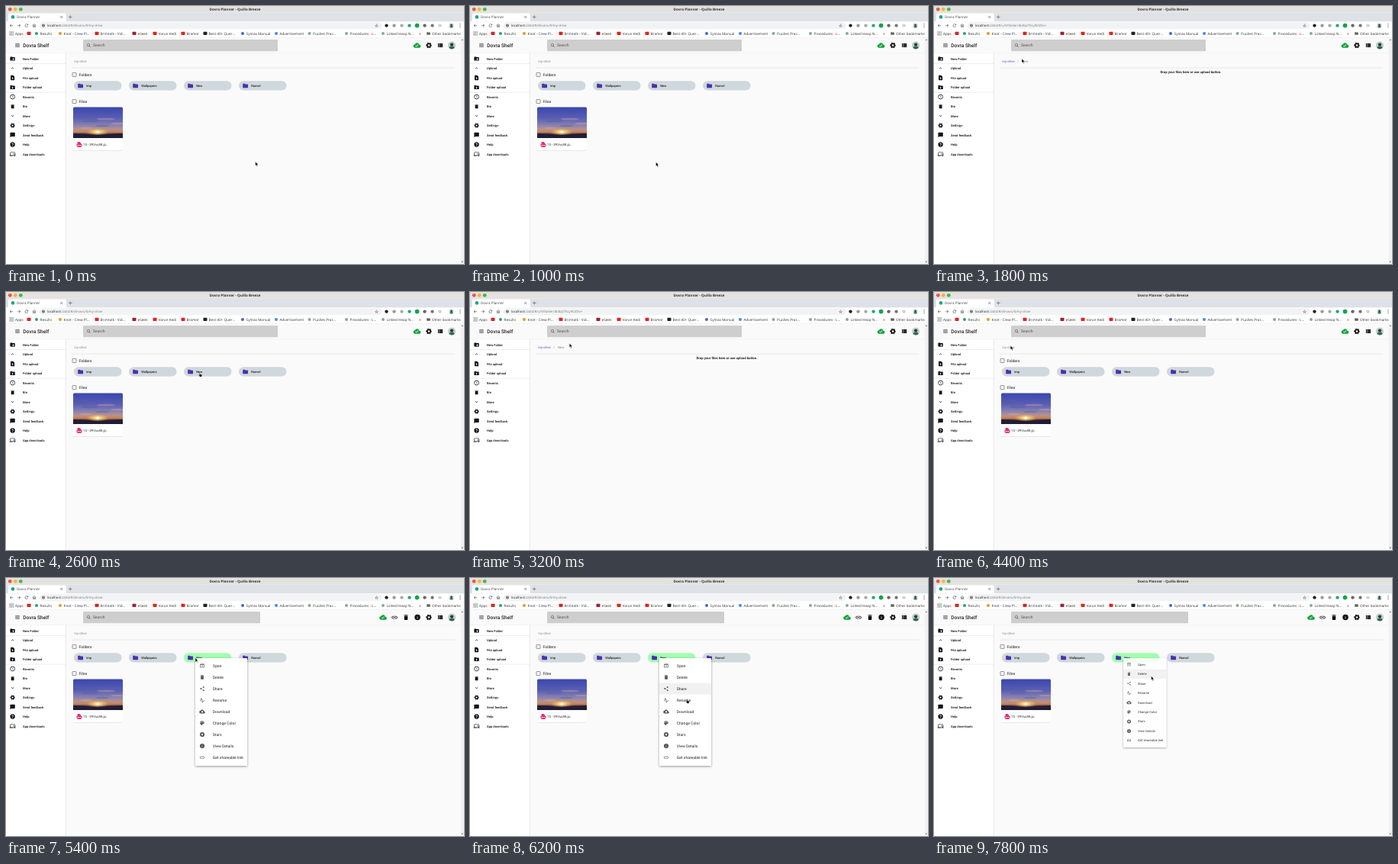
An HTML page for the animation above (8000 ms loop, 600 by 338 pixels).

```html
<!DOCTYPE html>
<html lang="en">
<head>
<meta charset="utf-8">
<title>Dovra Planner</title>
<style>
html, body { margin: 0; width: 100%; height: 100%; overflow: hidden; background: #fafafa; }
svg { display: block; width: 100%; height: 100%; }
text { font-family: Roboto, sans-serif; white-space: pre; text-rendering: geometricPrecision; }
.ui { font-family: "Open Sans", "Noto Sans", sans-serif; }
</style>
</head>
<body>
<svg id="stage" viewBox="0 0 600 338">
  <defs>
    <linearGradient id="sky" x1="0" y1="0" x2="0" y2="1">
      <stop offset="0" stop-color="#3a45ae"/>
      <stop offset=".38" stop-color="#5960b4"/>
      <stop offset=".58" stop-color="#8580b2"/>
      <stop offset=".72" stop-color="#b8918f"/>
      <stop offset=".81" stop-color="#c9854f"/>
      <stop offset=".87" stop-color="#5a3a4c"/>
      <stop offset="1" stop-color="#1d1a33"/>
    </linearGradient>
    <radialGradient id="sun">
      <stop offset="0" stop-color="#fffde0"/>
      <stop offset=".25" stop-color="#ffe58a" stop-opacity=".9"/>
      <stop offset="1" stop-color="#ffb74d" stop-opacity="0"/>
    </radialGradient>
    <filter id="shade" x="-20%" y="-20%" width="140%" height="140%">
      <feDropShadow dx="0" dy="1" stdDeviation="1.4" flood-opacity=".4"/>
    </filter>
    <filter id="soft" x="-20%" y="-20%" width="140%" height="140%">
      <feDropShadow dx="0" dy=".4" stdDeviation=".5" flood-opacity=".18"/>
    </filter>
    <clipPath id="photo"><path d="M88 173V134q0-1.5 1.5-1.5h62q1.5 0 1.5 1.5v39z"/></clipPath>
  </defs>
</svg>
<script>
const DISC = 'M12 2a10 10 0 1 0 0 20 10 10 0 0 0 0-20z';
const FOLDER = 'M10 4H4a2 2 0 0 0-2 2v12a2 2 0 0 0 2 2h16a2 2 0 0 0 2-2V8a2 2 0 0 0-2-2h-8z';
const CLOUD = 'M19.4 10A7.5 7.5 0 0 0 5.4 8 6 6 0 0 0 6 20h13a5 5 0 0 0 .4-10z';
const dot = (x, y, r) => `M${x - r} ${y}a${r} ${r} 0 1 0 ${2 * r} 0 ${r} ${r} 0 0 0 ${-2 * r} 0z`;
const ICONS = {
  menu: 'M3 18h18v-2H3zM3 13h18v-2H3zM3 6v2h18V6z',
  folder: FOLDER,
  newFolder: FOLDER + 'M19 13h-3v-3h-2v3h-3v2h3v3h2v-3h3z',
  upFolder: FOLDER + 'M11 18v-4H8l4-4 4 4h-3v4z',
  up: 'M12 8l-6 6 1.4 1.4L12 10.8l4.6 4.6L18 14z',
  down: 'M16.6 8.6L12 13.2 7.4 8.6 6 10l6 6 6-6z',
  file: 'M6 2a2 2 0 0 0-2 2v16a2 2 0 0 0 2 2h12a2 2 0 0 0 2-2V8l-6-6zM11 18v-4H8l4-4 4 4h-3v4z',
  image: 'M6 1h8l6 6v3h3v9h-3v4H4v-4H1v-9h3V3zM5 13v4h4v-4zM11 13v4h3v-4zM16 13v4h3v-4z',
  clock: DISC + dot(12, 12, 8) + 'M11 7h1.5v5.2l4.5 2.7-.8 1.3L11 13z',
  trash: 'M6 19a2 2 0 0 0 2 2h8a2 2 0 0 0 2-2V7H6zM19 4h-3.5l-1-1h-5l-1 1H5v2h14z',
  chat: 'M20 2H4a2 2 0 0 0-2 2v18l4-4h14a2 2 0 0 0 2-2V4a2 2 0 0 0-2-2z',
  help: DISC + 'M11 17h2v2h-2zM13 15h-2c0-3 3-3 3-5a2 2 0 0 0-4 0H8a4 4 0 0 1 8 0c0 2.5-3 2.8-3 5z',
  info: DISC + 'M11 11h2v6h-2zM11 7h2v2h-2z',
  devices: 'M4 6h18V4H4a2 2 0 0 0-2 2v11H0v3h14v-3H4zM23 8h-6a1 1 0 0 0-1 1v10a1 1 0 0 0 1 1h6a1 1 0 0 0 1-1V9a1 1 0 0 0-1-1zM22 17h-4v-7h4z',
  synced: CLOUD + 'M10 17l-3.5-3.5 1.4-1.4 2.1 2.1 5.2-5.2 1.4 1.4z',
  download: CLOUD + 'M17 13l-5 5-5-5h3V9h4v4z',
  link: 'M4 12a3 3 0 0 1 3-3h4V7H7a5 5 0 0 0 0 10h4v-2H7a3 3 0 0 1-3-3zM8 13h8v-2H8zM17 7h-4v2h4a3 3 0 0 1 0 6h-4v2h4a5 5 0 0 0 0-10z',
  list: 'M3 5h4v4H3zM3 10h4v4H3zM3 15h4v4H3zM8 5h13v4H8zM8 10h13v4H8zM8 15h13v4H8z',
  open: 'M19 4H5a2 2 0 0 0-2 2v12a2 2 0 0 0 2 2h4v-2H5V8h14v10h-4v2h4a2 2 0 0 0 2-2V6a2 2 0 0 0-2-2zM12 10l-4 4h3v6h2v-6h3z',
  share: dot(18, 5, 3) + dot(6, 12, 3) + dot(18, 19, 3) + 'M8.5 10l7-4 .8 1.5-7 4zM8.5 14l7 4 .8-1.5-7-4z',
  rename: 'M12.5 16h2L9.4 3H7.6L2.5 16h2l1.1-3h5.8zM6.4 11L8.5 5.5 10.6 11zM21.6 11.6L13.5 19.7 9.8 16l-1.4 1.4 5.1 5.1L23 13z',
  palette: 'M12 3a9 9 0 0 0 0 18 1.5 1.5 0 0 0 1-2.5c-.8-1 0-2.5 1.2-2.5H16a5 5 0 0 0 5-5c0-4.4-4-8-9-8z' +
    dot(6.5, 10.5, 1.5) + dot(9.5, 6.5, 1.5) + dot(14.5, 6.5, 1.5) + dot(17.5, 10.5, 1.5),
  star: DISC + 'M12 6l1.5 4 4.3.2-3.4 2.6 1.2 4.2-3.6-2.4-3.6 2.4 1.2-4.2-3.4-2.6 4.3-.2z',
  search: 'M15.5 14h-.8a6.5 6.5 0 1 0-.7.7v.8l5 5 1.5-1.5zM9.5 14a4.5 4.5 0 1 1 0-9 4.5 4.5 0 0 1 0 9z',
  back: 'M20 11H7.8l5.6-5.6L12 4l-8 8 8 8 1.4-1.4L7.8 13H20z',
  forward: 'M4 11h12.2l-5.6-5.6L12 4l8 8-8 8-1.4-1.4 5.6-5.6H4z',
  reload: 'M17.6 6.4A8 8 0 1 0 19.7 14h-2.1A6 6 0 1 1 16.2 7.8L13 11h7V4z',
  home: 'M12 3L2 12h3v8h6v-6h2v6h6v-8h3zM12 5.7l5 4.5V18h-2v-6H9v6H7v-7.8z',
  fav: 'M12 2l3 7 7 .6-5.3 4.8 1.6 7.1L12 17.8l-6.3 3.7 1.6-7.1L2 9.6 9 9zM12 6l-1.8 4.4-4.7.4 3.6 3.1-1.1 4.6 4-2.4 4 2.4-1.1-4.6 3.6-3.1-4.7-.4z'
};

const rect = (x, y, w, h, fill, extra = '') =>
  `<rect x="${x}" y="${y}" width="${w}" height="${h}" fill="${fill}" ${extra}/>`;
const circle = (x, y, r, fill, extra = '') => `<circle cx="${x}" cy="${y}" r="${r}" fill="${fill}" ${extra}/>`;
const text = (s, x, y, size, fill, extra = '') =>
  `<text x="${x}" y="${y}" font-size="${size}" fill="${fill}" ${extra}>${s}</text>`;
const path = (d, fill, extra = '') => `<path d="${d}" fill="${fill}" ${extra}/>`;
const UI = 'class="ui"', BOLD = 'font-weight="500"';
const group = (id, body) => `<g id="${id}">${body}</g>`;

function icon(name, x, y, size, fill = '#111') {
  const place = `transform="translate(${x - size / 2} ${y - size / 2}) scale(${size / 24})"`;
  if (name === 'gear') {
    return `<g ${place} fill="none" stroke="${fill}"><circle cx="12" cy="12" r="5.8" stroke-width="4.6"/>` +
      `<circle cx="12" cy="12" r="8.8" stroke-width="2.8" stroke-dasharray="4.6 4.615" stroke-dashoffset="2.3"/></g>`;
  }
  return path(ICONS[name], fill, `fill-rule="evenodd" ${place}`);
}

const avatar = (x, y, r) => circle(x, y, r, '#b9cfca') +
  circle(x, y - r * .2, r * .42, '#37322f') +
  path(`M${x - r * .75} ${y + r * .64}a${r * .78} ${r * .7} 0 0 1 ${r * 1.5} 0a${r} ${r} 0 0 1 ${-r * 1.5} 0z`, '#2f6b50');

function browser() {
  let s = rect(0, 0, 600, 8.5, '#e4e2df') + rect(0, 8.5, 600, 12, '#dee1e6');
  ['#f0524a', '#f5b52e', '#3fb950'].forEach((c, i) => s += circle(5.3 + 7 * i, 4.3, 2.4, c));
  s += text('Dovra Planner - Quillo Breeze', 300, 6.2, 4.6, '#333', UI + ' font-weight="700" text-anchor="middle"');
  s += path('M1 20.5q2 0 2-2v-7q0-2 2-2h72q2 0 2 2v7q0 2 2 2z', '#fff');
  s += circle(9, 14.4, 2.3, '#1fa67a') + text('Dovra Planner', 14, 16, 4.6, '#444', UI);
  s += path('M71 13l3 3m0-3l-3 3M82 14.4h4.6m-2.3-2.3v4.6', 'none', 'stroke="#555" stroke-width=".6"');
  s += rect(0, 20.5, 600, 21, '#fff') + rect(43.5, 21.2, 449, 9, '#f1f3f4', 'rx="4.5"');
  ['back', 'forward', 'reload', 'home'].forEach((n, i) => s += icon(n, 7 + 10 * i, 25.6, 6.4, '#555'));
  s += icon('info', 49, 25.6, 5, '#777') + icon('fav', 485.5, 25.6, 5.6, '#555');
  ['#222', '#999', '#aaa', '#1fa67a', '#17a34a', '#666', '#777', '#d0d0d0'].forEach((c, i) =>
    s += circle(498.5 + 10 * i, 25.6, i === 4 ? 2.9 : 2.2, c));
  s += avatar(583.5, 25.6, 3);
  for (let i = -1; i < 2; i++) s += circle(595, 25.6 + 2 * i, .6, '#555');

  for (let i = 0; i < 9; i++)
    s += rect(4.5 + 2 * (i % 3), 33.3 + 2 * (i / 3 | 0), 1.3, 1.3, ['#e05244', '#4a8bea', '#3aa657'][i % 3]);
  s += text('Apps', 12, 37.6, 4.6, '#333', UI);
  const marks = [
    [30, 'r#e62117', ''], [40, 'c#1fa67a', 'Results'], [71, 'c#f29423', 'Knot - Crew Pl...'],
    [119, 'r#e62117', 'Brimtalk - Vid...'], [168, 'r#a3202c', 'eSeek'], [195, 'r#e62117', 'Varun Kedi'],
    [232, 'r#e62117', 'Bramor'], [261, 'r#222', 'Best 40+ Quer...'], [310, 'c#4b62c9', 'Syntax Manual'],
    [354, 'c#4285f4', 'Advertisement'], [397.5, 'c#7fb08a', 'Puzzles Prac...'],
    [446, 'c#7fb08a', 'Procedures - L...'], [494, 'c#7fb08a', 'Linked Heap N...']
  ];
  for (const [x, mark, label] of marks) {
    const c = mark.slice(1);
    s += mark[0] === 'r' ? rect(x - 2.5, 33.7, 5, 4.4, c, 'rx=".8"') : circle(x, 36, 2, c);
    s += text(label, x + 4.6, 37.6, 4.65, '#333', UI);
  }
  s += text('»', 541, 37.6, 5.4, '#333', UI) + icon('folder', 553.5, 36, 5.6, '#666') +
    text('Other bookmarks', 558, 37.6, 4.6, '#333', UI);
  return s + rect(0, 41, 600, .5, '#ddd');
}

function sidebar() {
  const items = [['newFolder', 'New Folder'], ['up', 'Upload'], ['file', 'File upload'], ['upFolder', 'Folder upload'],
    ['clock', 'Recents'], ['trash', 'Bin'], ['down', 'More'], ['gear', 'Settings'], ['chat', 'Send feedback'],
    ['help', 'Help'], ['devices', 'App downloads']];
  return rect(0, 62, 78, 276, '#fff') + rect(77.8, 62, .6, 276, '#ddd') +
    rect(0, 75.3, 78, .5, '#ddd') + rect(0, 112.8, 78, .5, '#ddd') +
    items.map(([n, label], i) => icon(n, 8.6, 69 + 12.5 * i, 7.6) +
      text(label, 22, 70.6 + 12.5 * i, 4.15, '#111', BOLD)).join('');
}

function appBar() {
  return rect(0, 41.5, 596, 20.5, '#fafafa') + rect(0, 61.7, 596, .5, '#e8e8e8') +
    icon('menu', 15, 51.5, 7.6) + text('Dovra Shelf', 22.3, 53.6, 6.6, '#222', BOLD) +
    rect(101, 44, 255, 15.2, '#cecece', 'id="field" rx="1"') +
    icon('search', 108.5, 51.6, 7, '#555') + text('Search', 114, 53.4, 5.1, '#555') +
    group('plainBar', icon('synced', 538.5, 51.5, 9.6, '#12a53a')) +
    group('pickBar', icon('synced', 494, 51.5, 9.6, '#12a53a') + icon('link', 509, 51.5, 9) +
      icon('trash', 524, 51.5, 9) + icon('info', 539, 51.5, 9)) +
    icon('gear', 554, 51.5, 9) + icon('list', 569, 51.5, 8.4) + avatar(584, 51.5, 5);
}

function drive() {
  const heading = (label, y) => rect(87, y - 2.6, 5, 5, 'none', 'rx=".5" stroke="#666" stroke-width=".7"') +
    text(label, 95.5, y + 1.8, 5.1, '#444', BOLD);
  let s = text('my-drive', 89.3, 73.6, 4.3, '#888') + heading('Folders', 90) + heading('Files', 125.2);
  ['imp', 'Wallpapers', 'New', 'Ranvel'].forEach((label, i) => {
    const x = 89 + 72 * i;
    s += rect(x, 98.2, 62.5, 12.4, '#cfd8dc', `rx="6.2" ${i === 2 ? 'id="chip"' : ''}`) +
      icon('folder', x + 8.6, 104.5, 8.2, '#4a2fb0') + text(label, x + 16.2, 106, 4.1, '#222', BOLD);
  });
  s += rect(88, 132.5, 65, 56.5, '#fff', 'rx="1.5" filter="url(#soft)"');
  s += '<g clip-path="url(#photo)">' + rect(88, 132, 65, 41, 'url(#sky)');
  for (let i = 0; i < 6; i++)
    s += `<ellipse cx="${94 + 37 * i % 58}" cy="${145 + 3 * i}" rx="${13 - i}" ry="1.3" fill="${i % 2 ? '#d9a7a0' : '#5a5590'}" opacity=".4"/>`;
  s += '<ellipse cx="120" cy="165" rx="15" ry="5" fill="url(#sun)"/>' + circle(120, 165, 1.8, '#fffbe0') +
    path('M88 167l14 .5 18 1.5 18-1.5 15-.5v6H88z', '#211d35') + '</g>';
  return s + icon('image', 96, 181.6, 7.6, '#e5316f') + text('15 - S9Vux88.jp..', 101, 183.2, 4.35, '#333');
}

const folder = () => text('my-drive', 89.3, 73.6, 4.3, '#3f62c8') + text('/', 109.5, 73.6, 4.3, '#999') +
  text('New', 115, 73.6, 4.3, '#888') +
  text('Drop your files here or use upload button.', 336.5, 88, 4.3, '#222', 'font-weight="700" text-anchor="middle"');

function menu() {
  const items = [['open', 'Open'], ['trash', 'Delete'], ['share', 'Share'], ['rename', 'Rename'], ['download', 'Download'],
    ['palette', 'Change Color'], ['star', 'Stars'], ['info', 'View Details'], ['link', 'Get shareable link']];
  return rect(0, 0, 68, 141, '#fff', 'rx="1" filter="url(#shade)"') + rect(0, 0, 68, 15, '#f1f1f1', 'id="hover"') +
    items.map(([n, label], i) => icon(n, 9, 10 + 15 * i, 7.4, '#555') +
      text(label, 22.8, 11.8 + 15 * i, 5.05, '#222')).join('');
}

const host = 'localhost<tspan fill="#777">:2444/#/';
const ink = 'stroke="#fff" stroke-width=".4"';
document.getElementById('stage').insertAdjacentHTML('beforeend',
  rect(0, 0, 600, 338, '#fafafa') + browser() +
  group('driveUrl', text(host + 'drive/u/0/my-drive</tspan>', 54, 27.2, 4.3, '#222', UI)) +
  group('folderUrl', text(host + 'u/0/folder/dI4bJcTEcy9OZXx=</tspan>', 54, 27.2, 4.3, '#222', UI)) +
  appBar() + sidebar() + rect(86, 80.8, 502, .5, '#d8d8d8') +
  rect(595.6, 41.5, 4.4, 296.5, '#f1f1f1') + path('M596.6 45l1.2-1.6 1.2 1.6zM596.6 334.6l1.2 1.6 1.2-1.6z', '#666') +
  group('drive', drive()) + group('folder', folder()) + group('menu', menu()) +
  group('cursor',
    path('M0 0V5.4l1.2-1.1.9 2 .9-.4-.9-1.9h1.7z', '#000', ink + ' id="arrow"') +
    path('M.3.6q.6-.8 1.1 0v1.8l2.1.5q.5.2.4.8l-.5 2.1H1L-.7 3.6q.3-.7 1 0z', '#000', ink + ' id="hand"')));

const el = id => document.getElementById(id);
const show = (id, on) => el(id).style.display = on ? '' : 'none';

const LOOP = 8000, STEP = 200;
// time, x, y of the pointer tip
const route = [[0, 326.7, 204], [1000, 243.6, 204.6], [1200, 251, 105], [1600, 130, 68], [2000, 100, 70],
  [2600, 253, 105.3], [2800, 252, 105], [3200, 130.3, 67.3], [3800, 101, 70], [4400, 100.3, 70.3],
  [5200, 248, 104.5], [5400, 248, 104.5], [6000, 279, 144], [6200, 283.4, 158.4], [6600, 272, 214],
  [7200, 310, 106], [7600, 285, 128], [7800, 284.6, 128.4]];

function pointer(t) {
  let i = route.findIndex(k => k[0] > t);
  if (i < 0) i = route.length - 1;
  if (i === 0) i = 1;
  const a = route[i - 1], b = route[i];
  const u = Math.min(1, Math.max(0, (t - a[0]) / (b[0] - a[0])));
  const e = u * u * (3 - 2 * u);
  return [a[1] + (b[1] - a[1]) * e, a[2] + (b[2] - a[2]) * e];
}

function draw(ms) {
  const t = Math.floor(ms % LOOP / STEP) * STEP;
  const inFolder = (t >= 1200 && t < 2000) || (t >= 2800 && t < 4200);
  const picked = t >= 5400, closing = t >= 7800;
  for (const id of ['driveUrl', 'drive']) show(id, !inFolder);
  for (const id of ['folderUrl', 'folder']) show(id, inFolder);
  show('plainBar', !picked);
  show('pickBar', picked);
  show('menu', picked);
  el('field').setAttribute('width', picked ? 232 : 255);
  el('chip').setAttribute('fill', picked ? '#a3fdb0' : '#cfd8dc');

  // the highlight trails the pointer by one step
  const row = Math.round((pointer(t - STEP)[1] - 115) / 15);
  show('hover', row >= 0 && row < 9);
  el('hover').setAttribute('y', 2.5 + 15 * row);
  el('menu').setAttribute('transform', `translate(248 105) scale(${closing ? .83 : 1})`);
  el('menu').setAttribute('opacity', closing ? .88 : 1);

  const [x, y] = pointer(t);
  const onChip = !inFolder && !picked && y > 98 && y < 110 && x > 233 && x < 295;
  const hand = onChip || (picked && t > 5400 && !closing);
  show('hand', hand);
  show('arrow', !hand);
  el('cursor').setAttribute('transform', `translate(${x} ${y})`);
}

const start = performance.now();
function tick() {
  draw(performance.now() - start);
  requestAnimationFrame(tick);
}
tick();
</script>
</body>
</html>
```
